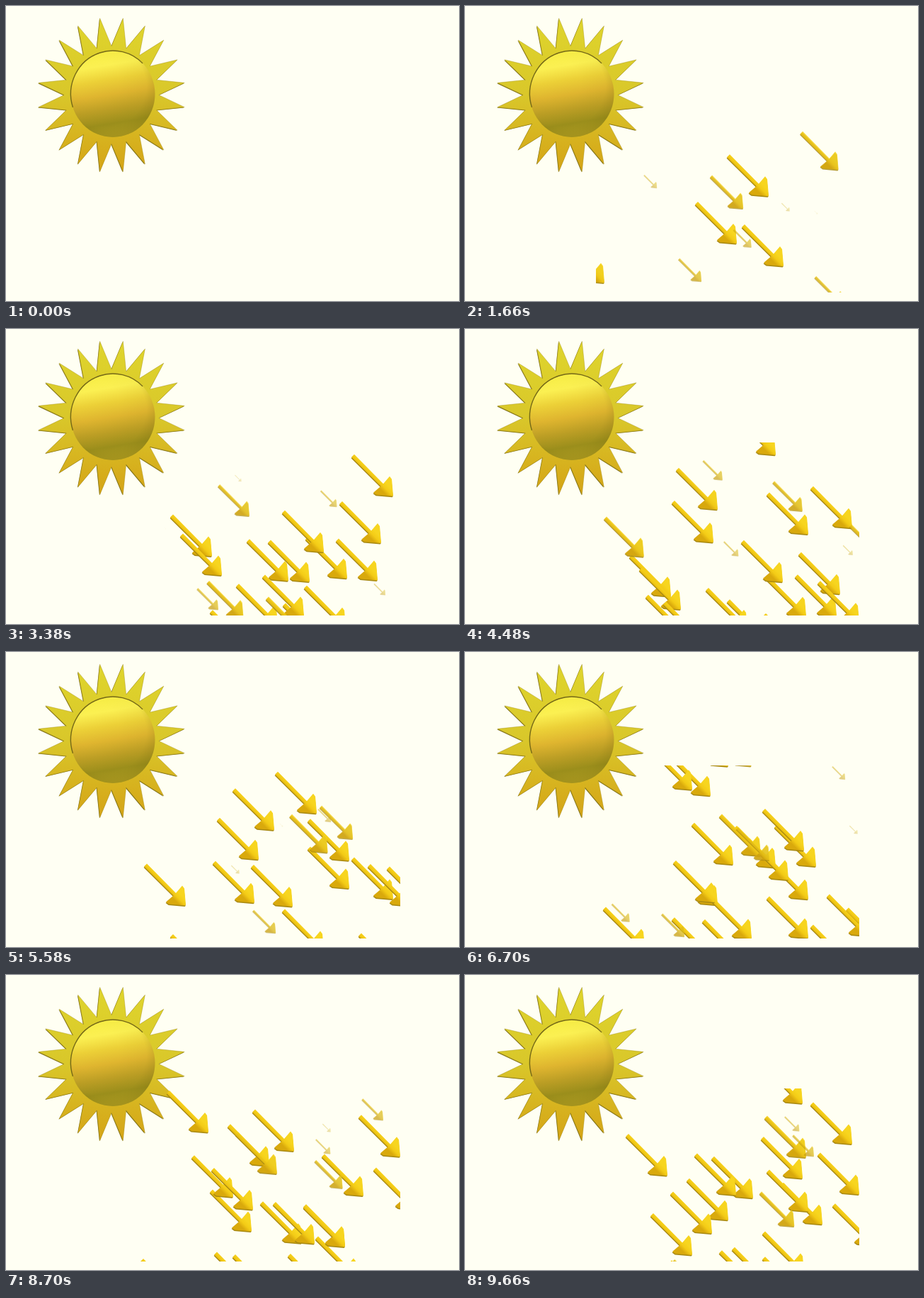
An HTML page with a canvas that plays this animation: 640 px wide and 416 px high, repeating every 9680 ms.

```html
<!DOCTYPE html>
<html lang="en">
<head>
<meta charset="utf-8">
<title>Sun and falling arrows</title>
<style>
html, body { margin: 0; width: 100%; height: 100%; overflow: hidden; background: #fffff3; }
canvas { display: block; }
</style>
</head>
<body>
<canvas id="stage" width="640" height="416"></canvas>
<script>
const ctx = document.getElementById('stage').getContext('2d');
const LOOP = 9680;
const GRAVITY = 0.0215;
const TAU = Math.PI * 2;

// Centres of the arrows at birth, in order of birth.
const births = [
  [400, 213], [355, 284], [421, 320], [168, 347], [501, 193], [370, 254],
  [514, 395], [318, 368], [392, 325], [262, 246], [453, 283], [496, 291],
  [276, 289], [518, 182], [420, 265], [451, 375], [397, 394], [310, 371],
  [322, 234], [410, 116], [285, 377], [456, 237], [528, 366], [328, 210],
  [225, 281], [568, 291], [456, 229], [318, 91], [350, 196], [376, 308],
  [541, 311], [428, 245], [467, 232], [292, 129], [365, 376], [343, 106],
  [450, 229], [324, 306], [389, 244], [378, 123], [407, 262], [257, 113],
  [294, 381], [220, 365], [528, 169], [549, 250], [476, 253], [450, 331],
  [320, 284], [354, 238], [448, 116], [456, 275], [518, 186], [448, 240],
  [453, 215], [441, 321], [314, 415], [478, 237], [462, 208]
];

// The emitter fires every three steps, pauses once, then fires every four.
function birthStep(i) {
  if (i > 45) return 150 + 4 * (i - 46);
  return 3 * i + (i > 30 ? 3 : 0);
}

function polygon(points) {
  const path = new Path2D();
  points.forEach(([x, y], i) => i ? path.lineTo(x, y) : path.moveTo(x, y));
  path.closePath();
  return path;
}

function gradient(x0, y0, x1, y1, colors) {
  const g = ctx.createLinearGradient(x0, y0, x1, y1);
  colors.forEach((color, i) => g.addColorStop(i / (colors.length - 1), color));
  return g;
}

// One side of the arrow; the other is its mirror image across the diagonal.
const side = [[-26, -30], [15, 11.5], [24, 1], [27, 5], [29, 28]];
const arrow = polygon([...side, ...side.map(([x, y]) => [y, x]).reverse()]);
const arrowFill = gradient(-4, 4, 4, -4, ['#d9a90c', '#f3cb16', '#f7d51f']);

function ring(count, rx, ry, offset) {
  return Array.from({ length: count }, (_, i) => {
    const a = TAU * (i + offset) / count;
    return [149 + rx * Math.sin(a), 125.5 - ry * Math.cos(a)];
  });
}

const tips = ring(20, 104.5, 109.5, 0.5);
const dips = ring(20, 67, 69, 0);
const rays = polygon(tips.flatMap((tip, i) => [dips[i], tip]));
const rayFill = gradient(0, 17, 0, 234, ['#dfd52c', '#d9c72a', '#d5a316']);
const ballFill = gradient(140, 63, 160, 185, [
  '#f8ee45', '#fbf052', '#ecd037', '#dfb52f', '#bd9f25', '#9c8f1c', '#b3a023'
]);
const ballShade = ctx.createRadialGradient(132, 108, 30, 146, 118, 76);
ballShade.addColorStop(0, 'rgba(110,100,10,0)');
ballShade.addColorStop(0.6, 'rgba(110,100,10,0.03)');
ballShade.addColorStop(1, 'rgba(110,100,10,0.3)');

function fillRaised(path, fill, shade, dx, dy) {
  ctx.save();
  ctx.translate(dx, dy);
  ctx.fillStyle = shade;
  ctx.fill(path);
  ctx.restore();
  ctx.fillStyle = fill;
  ctx.fill(path);
}

function drawSun() {
  fillRaised(rays, rayFill, '#81731a', -0.7, 0.8);
  ctx.strokeStyle = 'rgba(150,130,20,0.35)';
  ctx.lineWidth = 1;
  ctx.stroke(rays);

  ctx.beginPath();
  ctx.ellipse(151, 124, 59.5, 61, 0, 0, TAU);
  ctx.fillStyle = ballFill;
  ctx.fill();
  ctx.fillStyle = ballShade;
  ctx.fill();
  ctx.beginPath();
  ctx.ellipse(151, 124, 59.5, 61, 0, Math.PI * 0.9, Math.PI * 1.75);
  ctx.strokeStyle = '#746817';
  ctx.lineWidth = 1.4;
  ctx.stroke();
}

function drawArrow(x, y, age) {
  const cy = y + GRAVITY * age * age;
  if (age <= 0 || cy > 440) return;
  const scale = Math.min(1, age / 25);
  ctx.save();
  ctx.globalAlpha = Math.min(1, age / 28);
  ctx.translate(x, cy);
  ctx.scale(scale, scale);
  fillRaised(arrow, arrowFill, '#a88912', -0.4, 1.5);
  ctx.restore();
}

// Three uneven steps every 140 ms.
function stepAt(t) {
  const rest = t % 140;
  return 3 * Math.floor(t / 140) + (rest < 20 ? 0 : rest < 120 ? 1 : 2);
}

function draw(t) {
  const step = stepAt(t);
  ctx.fillStyle = '#fffff3';
  ctx.fillRect(0, 0, 640, 416);
  drawSun();
  ctx.save();
  ctx.beginPath();
  ctx.rect(185, 160, 372, 244);
  ctx.clip();
  births.forEach(([x, y], i) => drawArrow(x, y, step - birthStep(i)));
  ctx.restore();
}

const start = performance.now();
function tick() {
  draw((performance.now() - start) % LOOP);
  requestAnimationFrame(tick);
}
tick();
</script>
</body>
</html>
```
